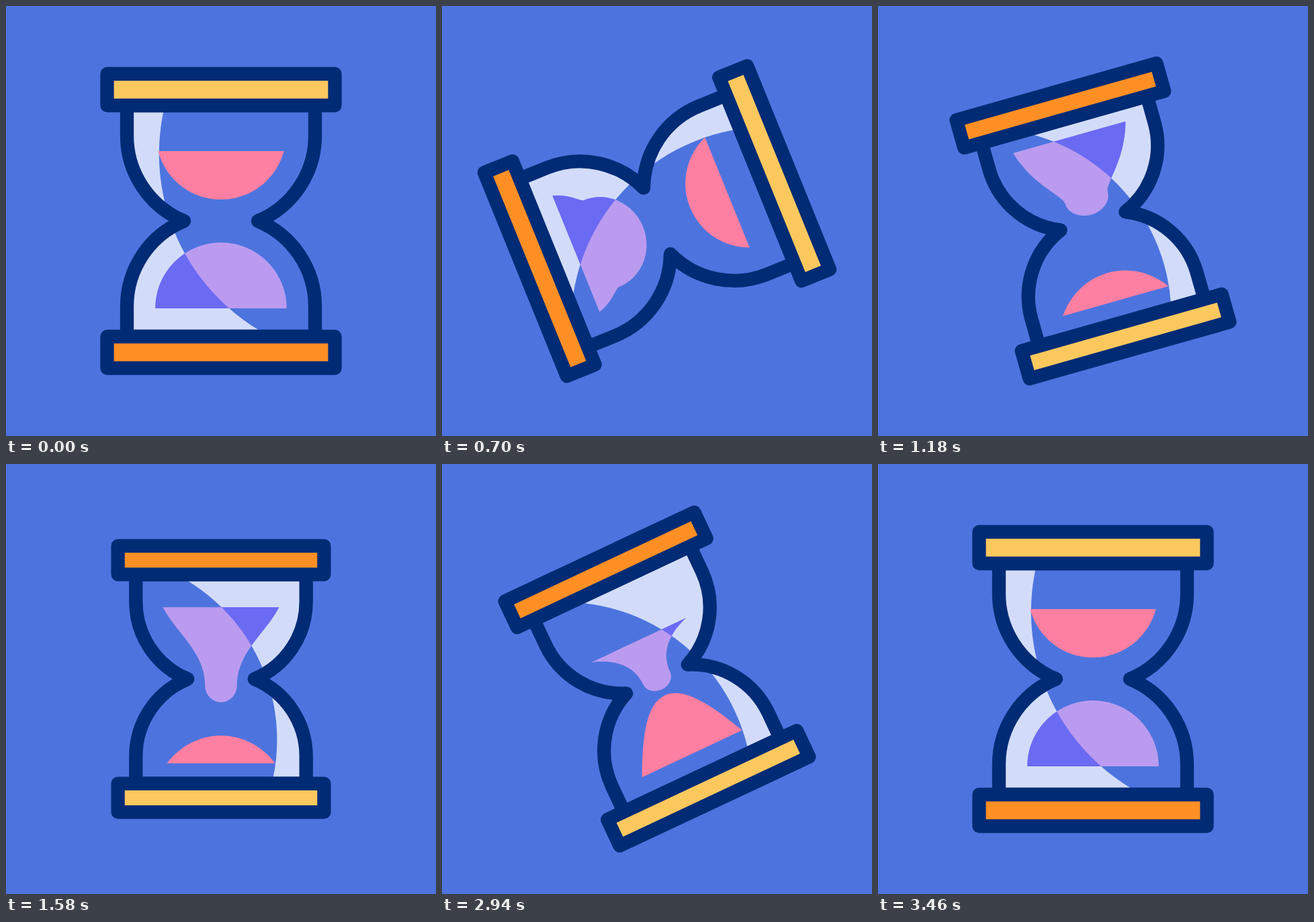
An HTML page for the animation above (3600 ms loop, 640x640 px).

```html
<!DOCTYPE html>
<html lang="en">
<head>
<meta charset="utf-8">
<title>Hourglass</title>
<style>
  html, body { margin: 0; width: 100%; height: 100%; overflow: hidden; background: #4d74de; }
  svg { display: block; width: 100%; height: 100%; }
</style>
</head>
<body>
<svg viewBox="0 0 640 640">
  <defs>
    <path id="glass" d="M-140 -172V-127A137.4 137.4 0 0 0 -55 0A137.4 137.4 0 0 0 -140 127V172H140V127A137.4 137.4 0 0 0 55 0A137.4 137.4 0 0 0 140 -127V-172Z"/>
    <clipPath id="inside"><use href="#glass"/></clipPath>
    <!-- everything outside the large circle -->
    <clipPath id="shine">
      <path clip-rule="evenodd" d="M-300 -300H700V400H-300ZM-92.2 -100a306 306 0 0 0 612 0a306 306 0 0 0 -612 0Z"/>
    </clipPath>
  </defs>
  <g id="dashes" stroke="#fcc858" stroke-width="20.5" stroke-linecap="round"></g>
  <g id="hourglass" stroke-linejoin="round">
    <g clip-path="url(#inside)">
      <rect x="-150" y="-180" width="300" height="360" fill="#d2dcfa" clip-path="url(#shine)"/>
    </g>
    <path class="drop" fill="#ba9bf0"/>
    <path class="drop" fill="#6b6af2" clip-path="url(#shine)"/>
    <path id="mound" fill="#fd7fa1"/>
    <g stroke="#022b75">
      <use href="#glass" fill="none"/>
      <rect x="-169.5" y="-219" width="339" height="47" fill="#fbc85e"/>
      <rect x="-169.5" y="172" width="339" height="47" fill="#fd8f25"/>
    </g>
  </g>
</svg>
<script>
const LOOP = 3600;
const TURN = [200, 1400];
const FALL = [1400, 1780];
const FILL = [1780, 2700];
const RETURN = [2800, 3400];
const DASH_LENGTH = 47;

// Drop: flat edge, then a side that narrows to a rounded neck.
// fall sets how steeply the side leaves the flat edge.
const dropRest = { width: 97.8, level: 130, neck: 97.8, neckY: 130, tip: 32, fall: 0.6 };
const dropSteps = [
  [TURN, { width: 95, level: 143, neck: 30, neckY: 30, tip: 8.7, fall: 0.6 }],
  [FALL, { width: 96, level: 89, neck: 22, neckY: -57, tip: -92, fall: 0 }],
  [FILL, { width: 82.7, level: 59.8, neck: 12, neckY: -20, tip: -27, fall: 0 }],
  [RETURN, dropRest]
];

// Mound: flat edge and one rounded peak; a smaller lean makes it more pointed.
const moundRest = { width: 93.5, level: -104, tip: -32, lean: 0.88 };
const moundSteps = [
  [TURN, { width: 89, level: -138.7, tip: -93.2, lean: 0.77 }],
  [FILL, { width: 89, level: -138.7, tip: -29, lean: 0.64 }],
  [RETURN, moundRest]
];

const hourglass = document.getElementById('hourglass');
const moundPath = document.getElementById('mound');
const dropPaths = document.querySelectorAll('.drop');
const dashGroup = document.getElementById('dashes');

const dashes = [];
for (const side of [-1, 1]) {
  for (const [dx, y] of [[198.5, 216.5], [236.5, 331.5]]) {
    const line = document.createElementNS('http://www.w3.org/2000/svg', 'line');
    line.setAttribute('x1', 320 + side * dx);
    line.setAttribute('x2', 320 + side * dx);
    dashGroup.append(line);
    dashes.push({ line, y });
  }
}

const lerp = (a, b, u) => a + (b - a) * u;

function ease(t, [start, end]) {
  const u = Math.min(1, Math.max(0, (t - start) / (end - start)));
  return u * u * (3 - 2 * u);
}

function poseAt(t, rest, steps) {
  const pose = { ...rest };
  for (const [span, next] of steps) {
    const u = ease(t, span);
    for (const key in pose) pose[key] = lerp(pose[key], next[key], u);
  }
  return pose;
}

// Right halves, from the corner of the flat edge to the tip.
function dropHalf({ width, level, neck, neckY, tip, fall }) {
  return [
    [width, level],
    [lerp(width, neck, 0.3), lerp(level, neckY, fall)],
    [neck, lerp(neckY, level, 0.75 - fall)],
    [neck, neckY],
    [neck, lerp(neckY, tip, 0.55)],
    [neck * 0.55, tip],
    [0, tip]
  ];
}

function moundHalf({ width, level, tip, lean }) {
  return [
    [width, level],
    [width * lean, lerp(level, tip, 0.59)],
    [width * lean * 0.54, tip],
    [0, tip]
  ];
}

function mirrored(half) {
  const other = half.slice(0, -1).reverse().map(([x, y]) => [-x, y]);
  const [first, ...rest] = [...half, ...other].map(p => p.map(v => v.toFixed(2)).join(' '));
  return `M${first}C${rest.join(' ')}Z`;
}

function draw(t) {
  const turn = ease(t, TURN) - ease(t, RETURN);
  const scale = 1 - 0.095 * turn;
  hourglass.setAttribute('transform', `translate(320 320) rotate(${180 * turn}) scale(${scale})`);
  hourglass.setAttribute('stroke-width', 20.3 / scale);

  moundPath.setAttribute('d', mirrored(moundHalf(poseAt(t, moundRest, moundSteps))));
  const d = mirrored(dropHalf(poseAt(t, dropRest, dropSteps)));
  dropPaths.forEach(path => path.setAttribute('d', d));

  const head = ease(t, [1820, 2220]);
  const tail = ease(t, [2400, 2780]);
  dashGroup.setAttribute('visibility', head > tail ? 'visible' : 'hidden');
  for (const { line, y } of dashes) {
    line.setAttribute('y1', y + DASH_LENGTH * tail);
    line.setAttribute('y2', y + DASH_LENGTH * head);
  }
}

function tick() {
  draw(performance.now() % LOOP);
  requestAnimationFrame(tick);
}
tick();
</script>
</body>
</html>
```
